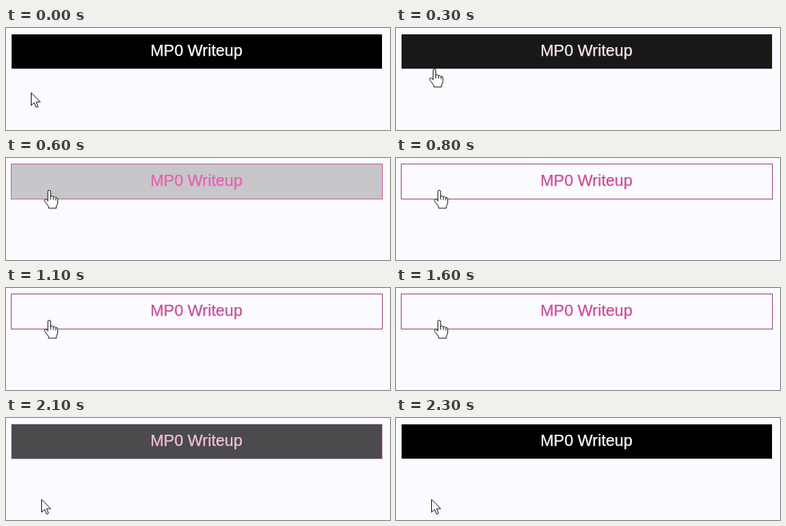
An HTML page that plays this animation: 480 px wide and 128 px high, repeating every 2400 ms.

```html
<!DOCTYPE html>
<html lang="en">
<head>
<meta charset="utf-8">
<title>Button hover</title>
<style>
  html, body { margin: 0; width: 100%; height: 100%; overflow: hidden; background: #fbfaff; }
  svg { display: block; }
  text { font: 20px "Liberation Sans", Arial, sans-serif; text-anchor: middle; stroke-width: .25; }
  .cursor path { fill: #fff; stroke: #222; stroke-linejoin: round; stroke-linecap: round; }
  .cursor .line { fill: none; }
</style>
</head>
<body>
<svg width="480" height="128" viewBox="0 0 480 128">
  <rect id="box" x="6.5" y="7.5" width="464" height="44"/>
  <text id="label" x="238" y="35">MP0 Writeup</text>
  <g id="arrow" class="cursor">
    <path d="M.5 .5V16.3L4.2 12.8 6.8 18.6 9.2 17.6 6.7 11.9H11.6Z"/>
  </g>
  <!-- The hand's hot spot is its fingertip -->
  <g id="hand" class="cursor">
    <path d="M-1.7 13.5V2.2Q-1.7 .5 0 .5T1.8 2.2V8.2Q3.6 6.6 5.2 8.8 7 7.6 8.2 9.8
             10.7 9 10.7 11.8V15.5Q10.7 18 9 20V23H-.8V20.8L-5.6 14.4Q-6.6 12.4-5 11.7-3.6 11.4-1.7 13.5Z"/>
    <path class="line" d="M1.8 8V12M5.2 9V12.3M8.2 10V12.8"/>
  </g>
</svg>
<script>
const LOOP = 2400, STEP = 100, KNEE = .75;
const [box, label, arrow, hand] =
  ["box", "label", "arrow", "hand"].map(id => document.getElementById(id));

const start = [31, 81], hover = [54, 40], end = [44, 102];
const black = [0, 0, 0], page = [251, 250, 255];
const ink = [[255, 255, 255], [238, 100, 182], [200, 78, 152]];
const edge = [[244, 243, 248], [206, 114, 168], [160, 86, 134]];

function ease(t, from, duration) {
  const p = Math.min(1, Math.max(0, (t - from) / duration));
  return p * p * (3 - 2 * p);
}
const mix = (a, b, p) => a.map((v, i) => v + (b[i] - v) * p);
const rgb = c => `rgb(${c.map(Math.round)})`;
const ramp = ([a, b, c], p) =>
  rgb(p < KNEE ? mix(a, b, p / KNEE) : mix(b, c, (p - KNEE) / (1 - KNEE)));

function draw() {
  const t = Math.floor(performance.now() % LOOP / STEP) * STEP;
  const fade = ease(t, 190, 580) - ease(t, 1800, 470);
  const [x, y] = mix(mix(start, hover, ease(t, 0, 450)), end, ease(t, 1630, 420)).map(Math.round);

  box.setAttribute("fill", rgb(mix(black, page, fade)));
  box.setAttribute("stroke", ramp(edge, fade));
  label.setAttribute("fill", ramp(ink, fade));
  label.setAttribute("stroke", ramp(ink, fade));

  const over = y < 52;
  arrow.style.display = over ? "none" : "";
  hand.style.display = over ? "" : "none";
  (over ? hand : arrow).setAttribute("transform", `translate(${x} ${y})`);
  requestAnimationFrame(draw);
}
draw();
</script>
</body>
</html>
```
